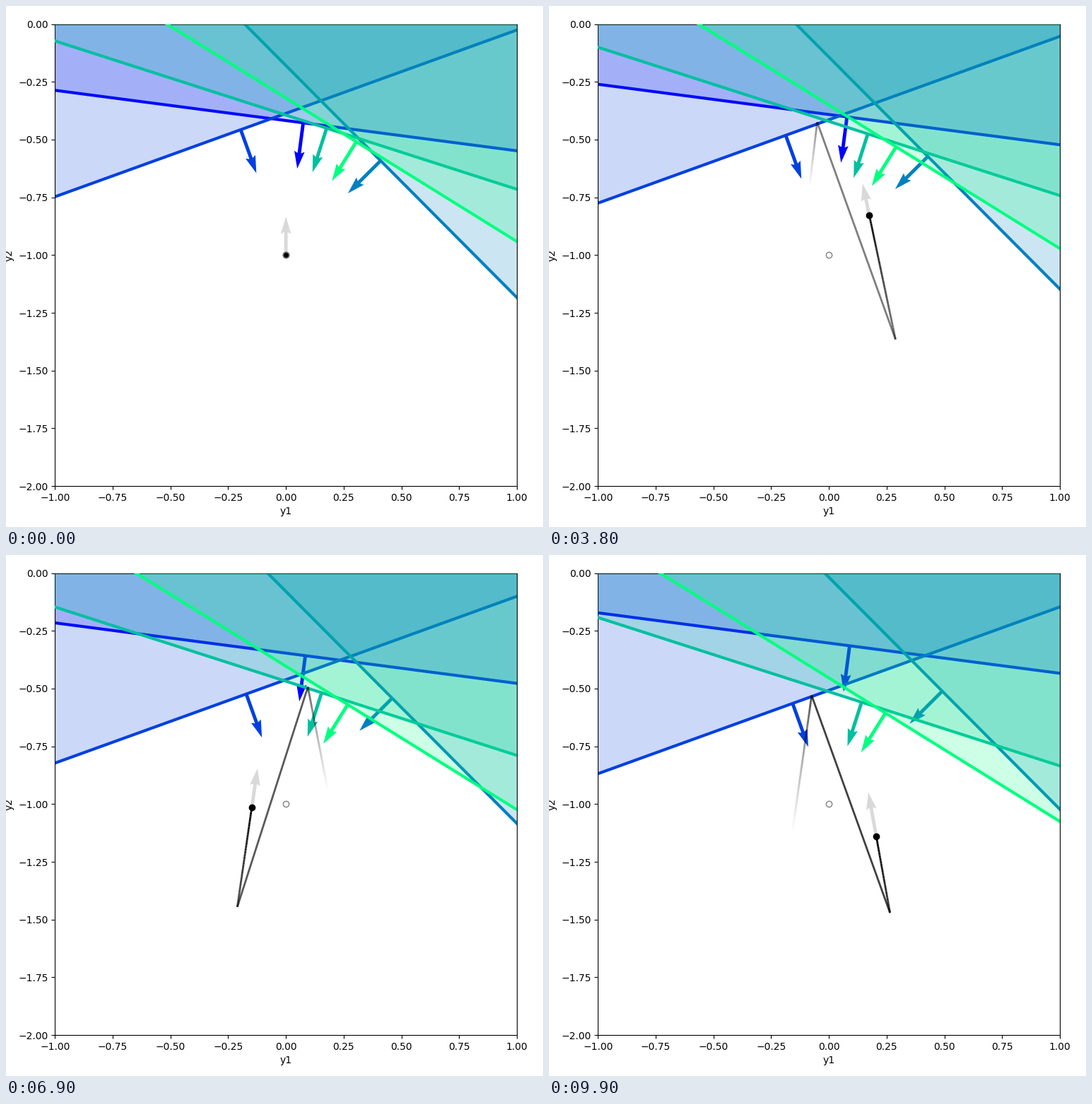
A matplotlib script for the animation above (10000 ms loop, 760 by 737 pixels).

```python
import numpy as np
import matplotlib.pyplot as plt
from matplotlib.animation import FuncAnimation
from matplotlib.collections import LineCollection

W, H, DPI = 760, 737, 100
FRAMES, FPS = 100, 10
SUB = 10            # simulation steps per stored trail point
DT = 0.001
TRAIL = 1.0         # seconds of visible history
DRIFT, DRIFT_START = 0.0144, 2.0
CENTER = np.array([0.0, -1.0])

# Each boundary is y2 = icept + slope * y1; sign gives its drift direction.
slope = np.array([-0.1309, 0.3608, -1.004, -0.321, -0.621])
icept = np.array([-0.4176, -0.3865, -0.1795, -0.394, -0.320])
sign = np.array([-1, 1, -1, 1, 1])
norm = np.hypot(slope, 1)
normals = np.column_stack([slope, -np.ones(5)]) / norm[:, None]
colors = plt.cm.winter(np.linspace(0, 1, 5))


def thresholds(t):
    return -icept / norm + sign * DRIFT * max(0.0, t - DRIFT_START)


def simulate():
    """Leaky decay to the origin; crossing a boundary kicks along its normal."""
    y = CENTER.copy()
    times, points, spikes = [0.0], [y.copy()], []
    decay = np.exp(-DT)
    for k in range(1, int(FRAMES / FPS / DT) + 1):
        t = k * DT
        y = y * decay
        gap = normals @ y - thresholds(t)
        i = int(np.argmin(gap))
        fired = gap[i] < 0
        if fired or k % SUB == 0:
            times.append(t)
            points.append(y.copy())
        if fired:
            y = y + normals[i]
            times.append(t)
            points.append(y.copy())
            spikes.append((t, i))
    return np.array(times), np.array(points), spikes


times, points, spikes = simulate()
segments = np.stack([points[:-1], points[1:]], axis=1)
seg_times = times[1:]

fig = plt.figure(figsize=(W / DPI, H / DPI), dpi=DPI)
side, left, top = 653.5, 69.4, 25.6
ax = fig.add_axes([left / W, 1 - (top + side) / H, side / W, side / H])
ax.set_xlabel("y1")
ax.set_ylabel("y2")

edge = np.array([-1.5, 1.5])
fills, lines, arrows = [], [], []
for i, c in enumerate(colors):
    fills += ax.fill([-1, 1, 1], [0, 0, 1], color=c, alpha=0.2, lw=0, zorder=i)
    lines += ax.plot([], [], color=c, lw=3, zorder=i)
    arrows.append(ax.quiver([0], [0], *normals[i][:, None], color=[c],
                            scale=10, zorder=i))

leak = ax.quiver([0], [-1], [0], [1], color="black", alpha=0.15, scale=12, zorder=5)
trail = LineCollection([], linewidths=2, zorder=6)
ax.add_collection(trail)
dot, = ax.plot([], [], "ko", zorder=7)
ax.plot(*CENTER, "o", mfc="none", mec="gray", zorder=8)
ax.set(xlim=(-1, 1), ylim=(-2, 0))


def update(frame):
    t = frame / FPS
    d = thresholds(t)
    fired = {i for ts, i in spikes if t - 1 / FPS + 1e-9 < ts <= t + 1e-9}
    for i, n in enumerate(normals):
        ends = slope[i] * edge - d[i] * norm[i]
        fills[i].set_xy([(edge[0], ends[0]), (edge[1], ends[1]),
                         (edge[1], 1), (edge[0], 1)])
        lines[i].set_data(edge, ends)
        lines[i].set_linewidth(10 if i in fired else 3)
        arrows[i].set_offsets([CENTER + (d[i] - n @ CENTER) * n])

    y = points[np.searchsorted(times, t + 1e-9) - 1]
    dot.set_data([y[0]], [y[1]])
    leak.set_offsets([y])
    leak.set_UVC([-y[0]], [-y[1]])

    age = t - seg_times
    shown = (age > -1e-9) & (age < TRAIL)
    rgba = np.zeros((shown.sum(), 4))
    rgba[:, 3] = np.clip(1 - age[shown] / TRAIL, 0, 1)
    trail.set_segments(segments[shown])
    trail.set_color(rgba)
    return [*fills, *lines, *arrows, leak, trail, dot]


anim = FuncAnimation(fig, update, frames=FRAMES, interval=1000 / FPS,
                     repeat=True, repeat_delay=0, blit=False)
plt.show()
```
